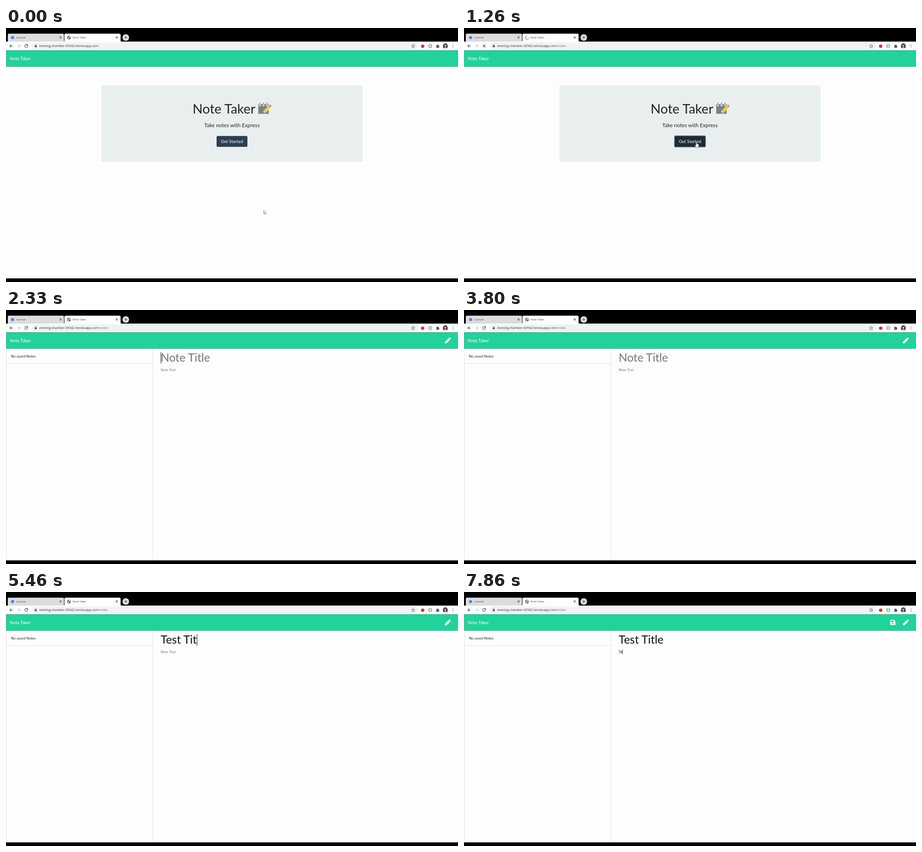
Animation of 998x561 px, one loop 8000 ms. Source, as an HTML page:

```html
<!DOCTYPE html>
<html lang="en">
<head>
<meta charset="utf-8">
<title>Note Taker</title>
<style>
  html, body { margin: 0; width: 100%; height: 100%; overflow: hidden; background: #000; }
  svg { display: block; width: 100vw; height: 100vh; }
  text { font-family: Lato, sans-serif; fill: #212529; white-space: pre; }
  .ui text { font-family: "Open Sans", "Noto Sans", sans-serif; font-size: 6.05px; fill: #45494d; }
  .ui .url { font-size: 6.91px; fill: #303336; }
  .ui .path { fill: #6b6f73; }
  .line { fill: none; stroke: #44484c; stroke-width: 1.1; }
  .mid { text-anchor: middle; }
  .brand { font-size: 9.75px; fill: #fff; }
  .h1 { font-size: 29.1px; }
  .lead { font-size: 11.7px; }
  .title { font-size: 24.95px; }
  .body { font-size: 7.8px; }
</style>
</head>
<body>
<svg viewBox="0 0 998 561">
  <rect width="998" height="561"/>

  <g class="ui">
    <path d="M4 30V15q0-2.5 2.500-2.500H125.500q2.500 0 2.500 2.500V30z" fill="#dcdcdc"/>
    <path d="M127 30q2 0 2-2V15q0-2.500 2.500-2.500H250.500q2.500 0 2.500 2.500V28q0 2 2 2z" fill="#fdfdfd"/>
    <rect y="30" width="998" height="19.500" fill="#fdfdfd"/>
    <circle cx="14.500" cy="21.200" r="3.400" fill="#4285f4"/>
    <text x="22.500" y="23.400">Lumvar</text>
    <text x="147" y="23.400">Note Taker</text>
    <path class="line" d="M118.500 19l4 4m0-4l-4 4M242.500 19l4 4m0-4l-4 4"/>
    <circle cx="264.500" cy="21" r="7.300" fill="#dcdcdc"/>
    <path class="line" d="M261 21h7m-3.500-3.500v7"/>
    <g id="globe">
      <circle cx="139" cy="21.200" r="3.900" fill="#54585c"/>
      <path d="M136 20.200l2.500.8 1 1.600-1 1.800-1.500-1.500zM139 18l2.400.8.8 2.400-1.800-.2-1.800-1.500z" fill="#fdfdfd"/>
    </g>
    <path id="spin" d="M139 17.700A3.500 3.500 0 1 0 142.500 21.200" fill="none" stroke="#4c7fe0" stroke-width="1.100"/>

    <path class="line" d="M15 39.700H8.500m3.200-3.200l-3.200 3.200 3.200 3.200"/>
    <path class="line" d="M25 39.700h6.500m-3.200-3.200l3.200 3.200-3.200 3.200" style="stroke:#c2c4c6"/>
    <g id="reload">
      <path class="line" d="M47 37.400A3.200 3.200 0 1 0 47.700 40.600"/>
      <path d="M48.300 35.800v3.500h-3.500z" fill="#44484c"/>
    </g>
    <path id="stop" class="line" d="M41.700 36.900l5.600 5.600m0-5.600l-5.600 5.600"/>
    <rect x="57" y="32" width="853" height="15.300" rx="7.650" fill="#f1f2f3"/>
    <rect x="63.500" y="38.700" width="4.400" height="3.900" rx=".4" fill="#54585c"/>
    <path class="line" d="M64.500 39v-1.200a1.200 1.200 0 0 1 2.400 0V39" style="stroke-width:.8"/>
    <text class="url" x="73.500" y="42.100">evening-chamber-05542.herokuapp.com<tspan id="path" class="path">/notes</tspan></text>
    <path class="line" d="M899 36l1.100 2.500 2.700.3-2 1.800.6 2.700-2.400-1.400-2.400 1.400.6-2.700-2-1.800 2.700-.3z" style="stroke-width:.8"/>
    <circle cx="920" cy="40.200" r="3.700" fill="#d9303e"/>
    <circle class="line" cx="936.700" cy="39.800" r="3.800" style="stroke-width:.8"/>
    <path class="line" d="M935.800 37.800q-.9 0-.9 1t-.5 1q.5 0 .5 1t.9 1m1.800-4q.9 0 .9 1t.5 1q-.5 0-.5 1t-.9 1" style="stroke-width:.6"/>
    <path d="M949.800 37.800h1.700a1.200 1.200 0 1 1 2.400 0h1.900v1.900a1.200 1.200 0 1 1 0 2.400v1.600h-6v-1.800a1.100 1.100 0 1 0 0-2.200z" fill="#54585c"/>
    <circle cx="970" cy="39.700" r="6" fill="#b7a3a6"/>
    <path d="M965.500 43.700q-1-9.500 4.500-9.500t4.500 9.500q-4.500 4-9 0z" fill="#452b31"/>
    <circle cx="970" cy="39.300" r="2.200" fill="#d9b9ae"/>
    <path d="M966.500 44.700q3.500-4.500 7 0-3.500 2-7 0z" fill="#e8e3e5"/>
    <path d="M987 37h.01m-.01 2.800h.01m-.01 2.800h.01" fill="none" stroke="#44484c" stroke-width="1.500" stroke-linecap="round"/>
  </g>

  <rect y="49.500" width="998" height="36" fill="#23d19b"/>
  <rect y="85.500" width="998" height="467.500" fill="#fdfdfd"/>
  <text class="brand" x="8.300" y="71">Note Taker</text>

  <g id="home">
    <rect x="210.500" y="127.300" width="577" height="168" rx="1.500" fill="#e9efee"/>
    <text class="h1" x="412" y="188.700">Note Taker</text>
    <g>
      <path d="M557 168h23v21.500H557z" fill="#7e8182"/>
      <path d="M560.500 171v-4.500m8 4.500v-4.500m8 4.500v-4.500" stroke="#e9efee" stroke-width="4.200" stroke-linecap="round"/>
      <path d="M560.500 170v-4.500m8 4.500v-4.500m8 4.500v-4.500" stroke="#909394" stroke-width="2" stroke-linecap="round"/>
      <path d="M567.500 188.300l1.800-5.800 10.200-10.200 4.200 4.200-10.300 10.200z" fill="#f2cd35" stroke="#e9efee" stroke-width=".6"/>
      <path d="M567.500 188.300l.8-2.500 1.700 1.700z" fill="#444"/>
      <path d="M579.200 172.600l1.500-1.500 4.200 4.200-1.500 1.500z" fill="#b9bdbe"/>
      <path d="M580.700 171.100l1.800-1.800q.8-.6 1.600 0l2 2q.8.8 0 1.700l-1.700 1.800z" fill="#d7a05b"/>
    </g>
    <text class="lead mid" x="499" y="219">Take notes with Express</text>
    <rect id="ring" x="463.600" y="237" width="70.800" height="27" rx="3.500" fill="#9fa8ae"/>
    <rect id="btn" x="465" y="238.400" width="68" height="24.200" rx="2.300"/>
    <text class="brand mid" x="499" y="254">Get Started</text>
  </g>

  <g id="notes">
    <path d="M.5 85.500V553M324.500 85.500V553M0 118.300H324.500" stroke="#dfe1e4" stroke-width="1"/>
    <text class="body" x="11" y="104.800">No saved Notes</text>
    <text id="title" class="title" x="341.500" y="114.400"></text>
    <text id="body" class="body" x="341.500" y="135"></text>
    <rect id="caret" width="1" fill="#111"/>
    <g fill="#fff">
      <path transform="translate(969 60.800) scale(.0254)" d="M291 93l128 128-278 278-114 13C11 513-2 501 0 485l13-114zM498 74l-60-60c-19-19-49-19-68 0l-57 57 128 128 57-57c19-19 19-49 0-68z"/>
      <path id="save" transform="translate(941 60.700) scale(.0254)" fill-rule="evenodd" d="M434 130l-84-84Q336 32 316 32H48Q0 32 0 80V432Q0 480 48 480H400Q448 480 448 432V164Q448 144 434 130zM224 416a64 64 0 1 1 0-128 64 64 0 1 1 0 128zM320 212q0 12-12 12H76q-12 0-12-12V108q0-12 12-12H305l15 15z"/>
    </g>
  </g>

  <path id="arrow" d="M0 0V8.200L1.900 6.500 3.100 9.100 4.300 8.500 3.200 6H5.700z" fill="#fff" stroke="#333" stroke-width=".6"/>
  <path id="hand" d="M-.9.800Q0-.4.900.800V4.300Q2 3.700 2.500 4.700 3.700 4.300 4 5.200 5.400 5 5.400 6.400V9L4.400 12.200H-.3L-3 8.300Q-3.400 6.800-2.200 6.900L-.9 8z" fill="#fff" stroke="#333" stroke-width=".6"/>
</svg>

<script>
const LOOP = 8000, BLINK = 520;
const MOVE = [60, 1000], PRESS = 1130, LOAD = 1195, OPEN = 1320, LEAVE = 1730;
const CLICK = 2230, TAB = 6790, SAVE = 7720;
const titleKeys = [3855, 4055, 4195, 4325, 4395, 4655, 5055, 5455, 5595, 5655];
const bodyKeys = [7655, 7850];

const $ = id => document.getElementById(id);
const show = (id, on) => $(id).setAttribute("display", on ? "inline" : "none");
const set = (id, attrs) => { for (const k in attrs) $(id).setAttribute(k, attrs[k]); };
const clamp = v => Math.max(0, Math.min(1, v));
const mix = (a, b, p) => a + (b - a) * p;
const blend = (a, b, p) => `rgb(${a.map((v, i) => Math.round(mix(v, b[i], p)))})`;

// Shows the typed part or the placeholder; returns the x of the caret.
function field(id, full, keys, hint, t) {
  const n = keys.filter(k => t >= k).length, el = $(id);
  el.textContent = n ? full.slice(0, n) : hint;
  el.style.fill = n ? "#111" : "#747779";
  return 341.5 + (n ? el.getComputedTextLength() : 0);
}

function drawPointer(t) {
  const p = clamp((t - MOVE[0]) / (MOVE[1] - MOVE[0])), e = p * p * (3 - 2 * p);
  const x = mix(569, 513, e), y = mix(402.5, 251.5, e);
  const over = y < 262.6;
  for (const id of ["arrow", "hand"]) set(id, { transform: `translate(${x} ${y})` });
  show("arrow", !over);
  show("hand", over && t < LEAVE);
  return over;
}

function drawCaret(t, titleX, bodyX) {
  const inBody = t >= TAB;
  const since = Math.max(...[CLICK, TAB, ...titleKeys, ...bodyKeys].filter(k => k <= t));
  show("caret", t >= CLICK && Math.floor((t - since) / BLINK) % 2 === 0);
  set("caret", inBody ? { x: bodyX - .3, y: 127, height: 10, width: .9 }
                      : { x: titleX, y: 93, height: 25.5, width: 1 });
}

function draw(t) {
  const home = t < OPEN, loading = t >= LOAD && home;
  show("home", home);
  show("notes", !home);
  show("path", t >= LOAD);
  show("globe", !loading);
  show("reload", !loading);
  show("spin", loading);
  show("stop", loading);
  set("spin", { transform: `rotate(${(t - 1260) * -.36} 139 21.2)` });

  const over = drawPointer(t);
  const hover = over ? clamp((t - 800) / 150) : 0;
  set("btn", { fill: t >= PRESS ? "#1e2b36" : blend([44, 62, 80], [30, 43, 55], hover) });
  show("ring", t >= PRESS);

  const titleX = field("title", "Test Title", titleKeys, "Note Title", t);
  const bodyX = field("body", "Te", bodyKeys, "Note Text", t);
  drawCaret(t, titleX, bodyX);
  show("save", t >= SAVE);
}

const start = performance.now();
function tick() {
  draw((performance.now() - start) % LOOP);
  requestAnimationFrame(tick);
}
tick();
</script>
</body>
</html>
```
